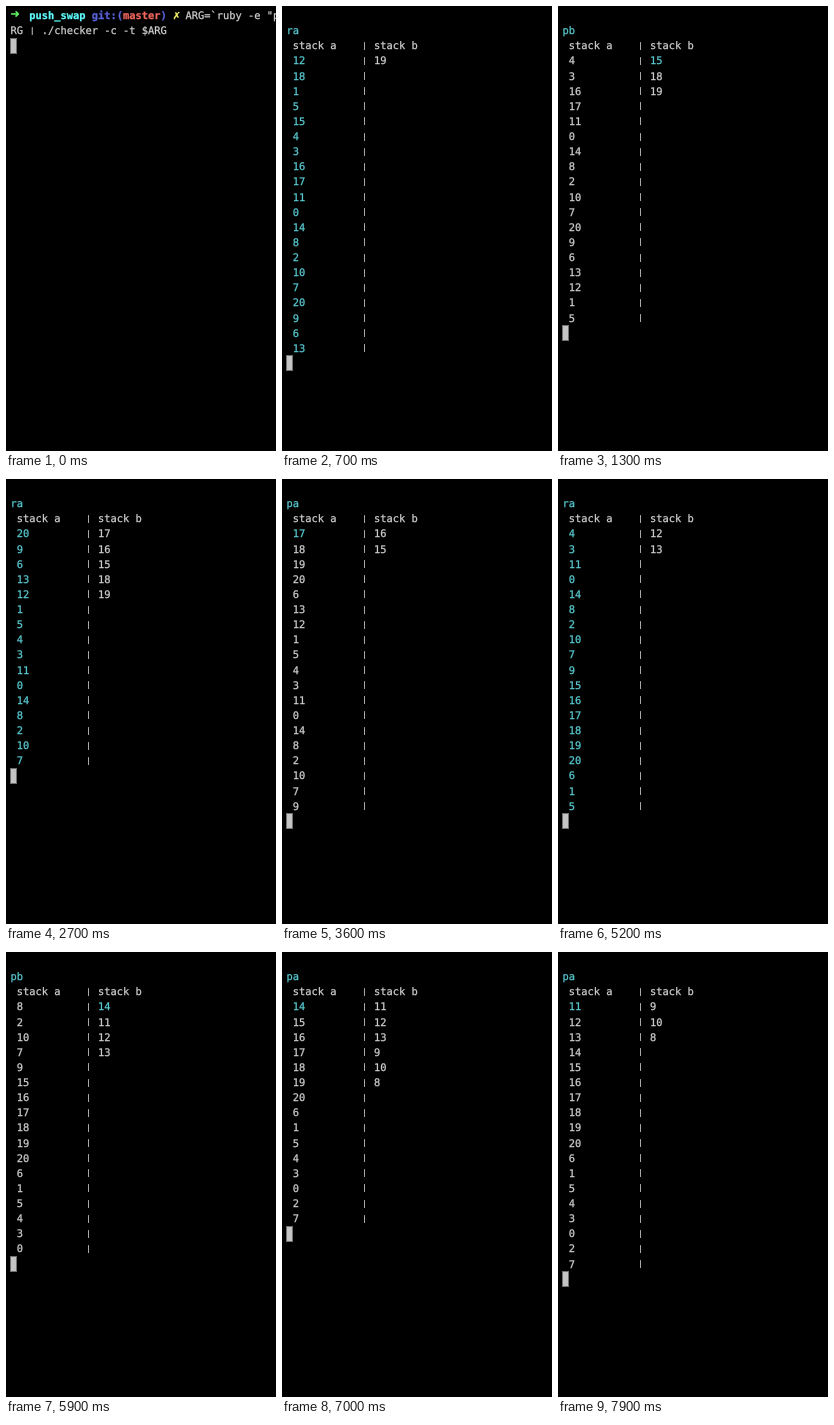
Animation, 270 px wide and 445 px high, one loop 8000 ms. Source, as an HTML page:

```html
<!DOCTYPE html>
<html lang="en">
<head>
<meta charset="utf-8">
<title>Stack sorting in a terminal</title>
<style>
  html, body { margin: 0; width: 100%; height: 100%; overflow: hidden; background: #000; }
  #screen {
    position: absolute; left: 4.5px; top: 3px;
    font: 10.38px/15.13px "DejaVu Sans Mono", monospace;
    text-rendering: geometricPrecision;
    font-variant-ligatures: none;
    -webkit-text-stroke: 0.25px currentColor;
    white-space: pre; color: #cfcfcf;
  }
  #cursor {
    position: absolute; left: 4px; box-sizing: border-box; width: 7px; height: 16px;
    background: #c4c4c4; border: 1px solid #707070;
  }
  i { display: inline-block; width: 6.25px; font-style: normal; line-height: 1px; }
  .bar { position: relative; top: -1.5px; font-size: 7.5px; text-align: center; }
  .arrow { font-size: 15px; }
  .cross { font-size: 12px; }
  .hot { color: #58cbd2; }
  .green { color: #5ff967; }
  .cyan { color: #60fdff; }
  .blue { color: #5a62dc; }
  .red { color: #f4675f; }
  .yellow { color: #fefb67; }
</style>
</head>
<body>
<div id="screen"></div>
<div id="cursor"></div>
<script>
const LOOP = 8000, TICK = 100, ROW = 15.1;
const PRINT_AT = 300, FIRST_OP = 336.5, OP_TIME = 124.5;

const START = [6, 19, 13, 12, 18, 1, 5, 15, 4, 3, 16, 17, 11, 0, 14, 8, 2, 10, 7, 20, 9];

// Each entry is an operation with an optional repeat count.
const OPS = `ra pb ra*2 pb ra*2 pb ra*2 pb*2 ra*7 pb ra
  pa rrb pa rrb pa*4 ra*7 pb*2 ra*4 pb ra pb
  pb ra pb ra pb rb*3 pa rb*2 pa rrb pa rrb pa`
  .trim().split(/\s+/)
  .flatMap(entry => {
    const [op, count = 1] = entry.split("*");
    return Array(+count).fill(op);
  });

function apply(op, { a, b }) {
  const stack = op.endsWith("a") ? a : b;
  const other = stack === a ? b : a;
  if (op[0] === "p") stack.unshift(other.shift());
  else if (op.startsWith("rr")) stack.unshift(stack.pop());
  else stack.push(stack.shift());
}

const states = [{ op: "", a: START, b: [] }];
for (const op of OPS) {
  const last = states[states.length - 1];
  const next = { op, a: [...last.a], b: [...last.b] };
  apply(op, next);
  states.push(next);
}

const hot = text => `<span class="hot">${text}</span>`;
const bold = (color, text) => `<b class="${color}">${text}</b>`;
const glyph = (kind, char) => `<i class="${kind}">${char}</i>`;
const BAR = glyph("bar", "|");

const PROMPT = bold("green", glyph("arrow", "➜")) + "  " + bold("cyan", "push_swap") + " " +
  bold("blue", "git:(") + bold("red", "master") + bold("blue", ")") + " " +
  bold("yellow", glyph("cross", "✗")) + ` ARG=\`ruby -e "p\nRG ${BAR} ./checker -c -t $ARG`;

function drawStacks({ op, a, b }) {
  // Rotations light the whole stack, pushes only its new top.
  const cell = (name, stack, row, width) => {
    const text = String(stack[row] ?? "").padEnd(width);
    const lit = op.endsWith(name) && (op[0] === "r" || row === 0);
    return lit ? hot(text) : text;
  };
  const lines = ["", hot(op), ` stack a    ${BAR} stack b`];
  for (let row = 0; row < Math.max(a.length, b.length); row++) {
    lines.push(" " + cell("a", a, row, 11) + BAR + " " + cell("b", b, row, 0));
  }
  return lines.join("\n");
}

const screenBox = document.getElementById("screen");
const cursor = document.getElementById("cursor");
let shown = null;

function frame() {
  const time = Math.floor(performance.now() % LOOP / TICK) * TICK;
  const step = time < PRINT_AT ? -1
    : Math.min(OPS.length, Math.max(0, 1 + Math.floor((time - FIRST_OP) / OP_TIME)));
  if (step !== shown) {
    shown = step;
    const html = step < 0 ? PROMPT : drawStacks(states[step]);
    screenBox.innerHTML = html;
    cursor.style.top = Math.round(1.8 + html.split("\n").length * ROW) + "px";
  }
  requestAnimationFrame(frame);
}
frame();
</script>
</body>
</html>
```
